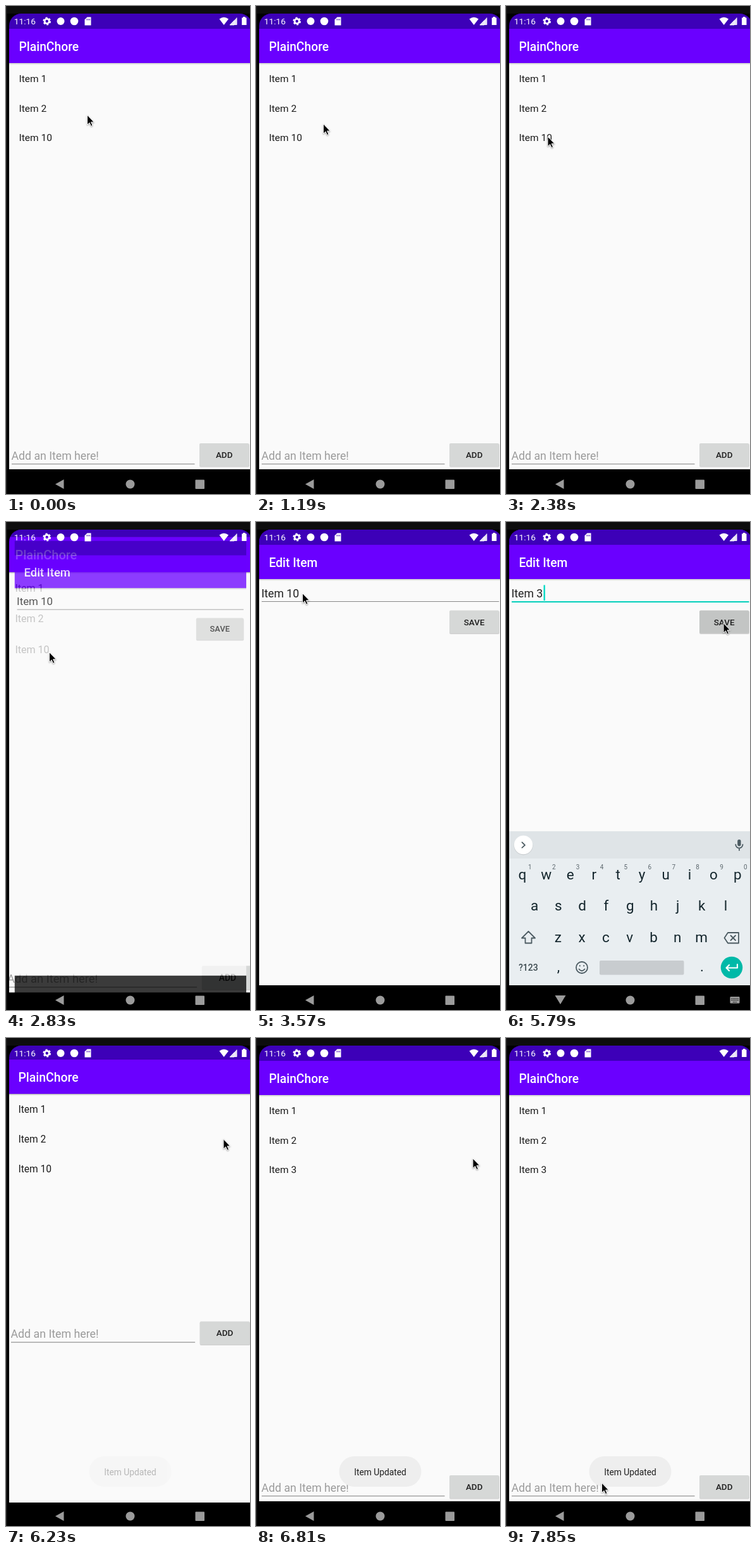
Animation of 386 by 770 pixels, one loop 7.99 s. Source, as an HTML page:

```html
<!DOCTYPE html>
<html lang="en">
<head>
<meta charset="utf-8">
<title>To-do list demo</title>
<style>
  html, body { margin: 0; width: 100%; height: 100%; overflow: hidden; background: #000; }
  svg { display: block; width: 386px; height: 770px; font-family: Roboto, Arial, sans-serif; }
  .title { font-size: 19.3px; font-weight: 500; fill: #fff; }
  .item { font-size: 15.5px; fill: #1c1c1c; }
  .field { font-size: 17.7px; fill: #222; }
  .hint { fill: #9b9b9b; }
  .label { font-size: 13.5px; font-weight: 500; fill: #202020; text-anchor: middle; }
  .toast { font-size: 13.8px; fill: #202020; text-anchor: middle; }
  .key { font-size: 22.5px; fill: #14262d; text-anchor: middle; }
  .digit { font-size: 10px; fill: #5d686e; text-anchor: middle; }
  .icon { fill: none; stroke: #4c5b62; stroke-width: 1.8; stroke-linecap: round; stroke-linejoin: round; }
</style>
</head>
<body>
<svg viewBox="0 0 386 770">
  <defs>
    <clipPath id="screenClip"><rect x="5" y="12" width="384" height="790" rx="19"/></clipPath>
    <clipPath id="keysClip"><rect x="5" y="12" width="384" height="719"/></clipPath>
    <linearGradient id="shade" x2="0" y2="1">
      <stop stop-color="#000" stop-opacity=".2"/><stop offset="1" stop-color="#000" stop-opacity="0"/>
    </linearGradient>
  </defs>
  <rect width="386" height="770" fill="#000"/>
  <rect width="386" height="12" fill="#0d0d0d"/>
  <rect width="1.5" height="770" fill="#202020"/>
  <g clip-path="url(#screenClip)">
    <g id="list"></g>
    <g id="edit"></g>
    <g clip-path="url(#keysClip)"><g id="keys"></g></g>
    <g id="toast">
      <rect x="131.5" y="660" width="130" height="48" rx="24" fill="#eee"/>
      <text class="toast" x="196.5" y="689.5">Item Updated</text>
    </g>
  </g>
  <g id="status"></g>
  <g id="nav" fill="#9b9b9b">
    <path id="back" d="M78 754.5L91.500 747V762Z"/>
    <path id="down" d="M77.500 747H94.500L86 761Z"/>
    <circle cx="196.500" cy="754.500" r="7"/>
    <rect x="299.500" y="747.500" width="14.500" height="14.500" rx="1"/>
    <g id="switcher">
      <rect x="354.500" y="749" width="15" height="10.500" rx="1"/>
      <path d="M356.500 752H368M356.500 754.500H368M359 757.500H365" stroke="#000" stroke-width="1.200" stroke-dasharray="1.500 .9"/>
    </g>
  </g>
  <path id="cursor" d="M0 0V15.500L3.600 12.200L6.100 17.600L8.500 16.500L6.100 11.200H10.800Z"
    stroke="#fff" stroke-width="1" style="filter:drop-shadow(0 1px 1px #0006)"/>
</svg>

<script>
const LOOP = 7990;
const $ = id => document.getElementById(id);
const text = (cls, x, y, s, id = '') => `<text class="${cls}" x="${x}" y="${y}" id="${id}">${s}</text>`;
const rect = (x, y, w, h, fill, more = '') =>
  `<rect x="${x}" y="${y}" width="${w}" height="${h}" fill="${fill}" ${more}/>`;
const button = (y, s, id) =>
  rect(306, y + 1, 79, 36.5, '#000', 'rx="2" opacity=".16"') +
  rect(306, y, 78.5, 36, '#d6d8d7', `rx="2" id="${id}"`) +
  text('label', 345.2, y + 23, s);

// A full app window: status strip, bar, page and navigation strip.
const appWindow = (title, body) =>
  rect(5, 12, 384, 24, '#3d00b8') +
  rect(5, 90, 384, 641, '#fafafa') +
  body +
  rect(5, 36, 384, 54, '#6a00ff') +
  rect(5, 90, 384, 3, 'url(#shade)') +
  text('title', 20.5, 70.5, title) +
  rect(5, 731, 384, 57, '#000');

$('list').innerHTML = appWindow('PlainChore',
  text('item', 20.5, 119.5, 'Item 1') +
  text('item', 20.5, 166.5, 'Item 2') +
  text('item', 20.5, 213.3, 'Item 10', 'third') +
  '<g id="adder">' +
    text('field hint', 8.5, 715.5, 'Add an Item here!') +
    rect(9, 722, 289.5, 1.3, '#999') +
    button(690, 'ADD', 'add') +
  '</g>');

$('edit').innerHTML = appWindow('Edit Item',
  text('field', 8.5, 118.5, 'Item 10', 'entry') +
  rect(9, 125, 375.5, 1, '#888', 'id="line"') +
  rect(0, 99.5, 2.4, 24.5, '#03dac5', 'id="caret"') +
  '<path id="handle" fill="#03cfbb" d="M68.500 126L75 129A10 10 0 1 1 62 129Z"/>' +
  button(139.5, 'SAVE', 'save'));

function buildKeys() {
  const pitch = 37.8;
  const row = (letters, x, y) =>
    [...letters].map((c, i) => text('key', x + i * pitch, y, c)).join('');
  const digits = [...'1234567890'].map((c, i) => text('digit', 37.8 + i * 37.9, 548, c)).join('');
  return rect(5, 488, 384, 243, '#e9eef1') + rect(5, 488, 384, 43, '#dfe4e7') +
    `<circle cx="27.500" cy="510.500" r="15" fill="#000" opacity=".1"/>
    <circle cx="27.500" cy="509.500" r="14.700" fill="#fff"/>
    <path class="icon" id="chevron" d="M30 505.500L25.500 509.500L30 514"/>
    <g id="tools">
      <g class="icon">
        <circle cx="77" cy="508" r="5.300"/><path d="M81 512L86 517"/>
        <path d="M127.500 502.500H141.500V511L136 517H127.500ZM141.500 511H136V517M131.500 510Q134 513 136.500 510"/>
        <path d="M131.500 506.500V507M137.500 506.500V507"/>
      </g>
      <text x="189.300" y="514" text-anchor="middle" font-size="13.500" font-weight="900" fill="#4c5b62">GIF</text>
      <rect x="238" y="502" width="16" height="16" fill="#5b686f"/>
      <rect x="279.500" y="499" width="1" height="21" fill="#c7cdd1"/>
      <g fill="#4c5b62"><circle cx="308.500" cy="510" r="2"/><circle cx="314.800" cy="510" r="2"/><circle cx="321" cy="510" r="2"/></g>
    </g>
    <rect x="366.200" y="501" width="5.400" height="10.500" rx="2.700" fill="#4c5b62"/>
    <path class="icon" d="M363.300 509A5.600 5.600 0 0 0 374.500 509M369 514.800V518"/>` +
    row('qwertyuiop', 26, 563.5) + digits +
    row('asdfghjkl', 45, 612.5) + row('zxcvbnm', 82.3, 662.5) +
    `<g class="icon">
      <path d="M35.500 646L46 656.500H40.500V664.500H30.500V656.500H25Z"/>
      <path d="M351 648H368V664.500H351L345.500 656.200ZM355.500 652.500L363 660M363 652.500L355.500 660"/>
      <circle cx="120" cy="703" r="9"/><path d="M115.500 705.500Q120 711 124.500 705.500M116.800 700V700.500M123.200 700V700.500"/>
    </g>
    <text x="35.300" y="708" text-anchor="middle" font-size="14" font-weight="500" fill="#3c4a50">?123</text>` +
    text('key', 83, 709, ',') + text('key', 310, 709, '.') +
    rect(148, 692, 133.5, 22.5, '#c8cccf', 'rx="2"') +
    `<circle cx="357" cy="703" r="17.300" fill="#00b9a8"/>
    <path class="icon" style="stroke:#fff;stroke-width:2.200" d="M366 698V703.500H349M353 699L348.500 703.500L353 708"/>`;
}
$('keys').innerHTML = buildKeys();

$('status').innerHTML = `
  <text x="12.800" y="28.800" font-size="13.700" fill="#fff">11:16</text>
  <g fill="#fff">
    <g fill="none" stroke="#fff"><circle cx="64.700" cy="24" r="3.600" stroke-width="2.800"/>
      <circle cx="64.700" cy="24" r="5.400" stroke-width="2" stroke-dasharray="3 2.650"/></g>
    <circle cx="86.500" cy="24" r="6"/>
    <circle cx="108" cy="24" r="6.300"/>
    <path d="M128.500 17.500H134.500V30.500H124.500V21.500Z"/>
    <path d="M337.500 20.500Q344.700 15 352 20.500L344.700 30Z"/>
    <path d="M365.500 18V30H354Z" opacity=".4"/>
    <path d="M361 22.800V30H354ZM365 18.500V29.500H354.500" stroke="#fff" stroke-width=".8" fill-opacity=".8"/>
    <path d="M373 18.500H375V17H378.500V18.500H380.500V30H373Z"/>
  </g>
  <path d="M128 20.300V22.500M130.200 20.300V22.500M132.400 20.300V22.500" stroke="#3d00b8"/>`;

const start = {
  listScale: 1, editScale: 1, editAlpha: 0, adderUp: false, third: 'Item 10',
  entry: 'Item 10', focus: false, caret: 70, handle: 0, pressed: false,
  keysDrop: 243, tools: true, toast: 0
};

// Each step keeps its values until a later one replaces them.
const steps = [
  [2830, { listScale: 1.035, editScale: .954, editAlpha: .76 }],
  [2970, { listScale: 1.05, editScale: .992, editAlpha: 1 }],
  [3120, { listScale: 1, editScale: 1 }],
  [3860, { focus: true, handle: 1 }],
  [4010, { keysDrop: 170 }],
  [4160, { keysDrop: 30 }],
  [4300, { keysDrop: 0 }],
  [4600, { entry: 'Item', caret: 48.5, handle: .22 }],
  [4750, { entry: 'Item 3', caret: 59.5, handle: 0, tools: false }],
  [5780, { pressed: true }],
  [6080, { listScale: 1.035, adderUp: true, editScale: .95, editAlpha: .3, keysDrop: 150, pressed: false }],
  [6230, { listScale: 1.006, editAlpha: 0, keysDrop: 243, toast: .3 }],
  [6370, { listScale: 1, adderUp: false, third: 'Item 3', toast: 1 }]
];

const pointer = [
  [0, 128.5, 172], [300, 122, 175], [440, 112, 183], [590, 106.5, 187],
  [1190, 106.5, 186], [1340, 100, 190], [1480, 90, 196], [1630, 80, 201], [1780, 76, 202.5],
  [2230, 72, 204], [2380, 66, 206], [2530, 68.5, 205.5],
  [3270, 70, 180], [3420, 72, 136], [3570, 73.5, 112.5],
  [5190, 110, 118], [5340, 200, 136], [5490, 290, 152], [5640, 340, 160], [5780, 344, 159.5],
  [6670, 343, 190], [6820, 342, 270], [6960, 340, 380], [7110, 336, 490], [7260, 333, 580],
  [7410, 331, 621], [7560, 262, 655], [7710, 190, 688], [7850, 151.5, 702]
];

const set = (id, attrs) => {
  for (const name in attrs) $(id).setAttribute(name, attrs[name]);
};
const show = (id, on) => set(id, { visibility: on ? 'visible' : 'hidden' });
const zoom = k => `translate(195 400) scale(${k}) translate(-195 -400)`;

function render(t) {
  const s = Object.assign({}, start, ...steps.filter(p => p[0] <= t).map(p => p[1]));
  const [, x, y] = pointer.filter(p => p[0] <= t).pop();
  const typing = s.keysDrop < 243;

  set('list', { transform: zoom(s.listScale) });
  set('adder', { transform: `translate(0 ${s.adderUp ? -243 : 0})` });
  $('third').textContent = s.third;

  set('edit', { transform: zoom(s.editScale), opacity: s.editAlpha });
  $('entry').textContent = s.entry;
  set('line', s.focus ? { y: 125, height: 2, fill: '#03cfbb' } : { y: 125, height: 1, fill: '#888' });
  set('caret', { x: s.caret, opacity: +s.focus });
  set('handle', { opacity: s.handle });
  set('save', { fill: s.pressed ? '#c3c5c4' : '#d6d8d7' });

  set('keys', { transform: `translate(0 ${s.keysDrop})` });
  show('keys', typing);
  set('tools', { opacity: +s.tools });
  set('chevron', { transform: s.tools ? '' : 'rotate(180 27.700 509.700)' });
  show('back', !typing);
  show('down', typing);
  show('switcher', typing);
  set('toast', { opacity: s.toast });
  set('cursor', { transform: `translate(${x} ${y})` });
}

function tick() {
  render(performance.now() % LOOP);
  requestAnimationFrame(tick);
}
tick();
</script>
</body>
</html>
```
